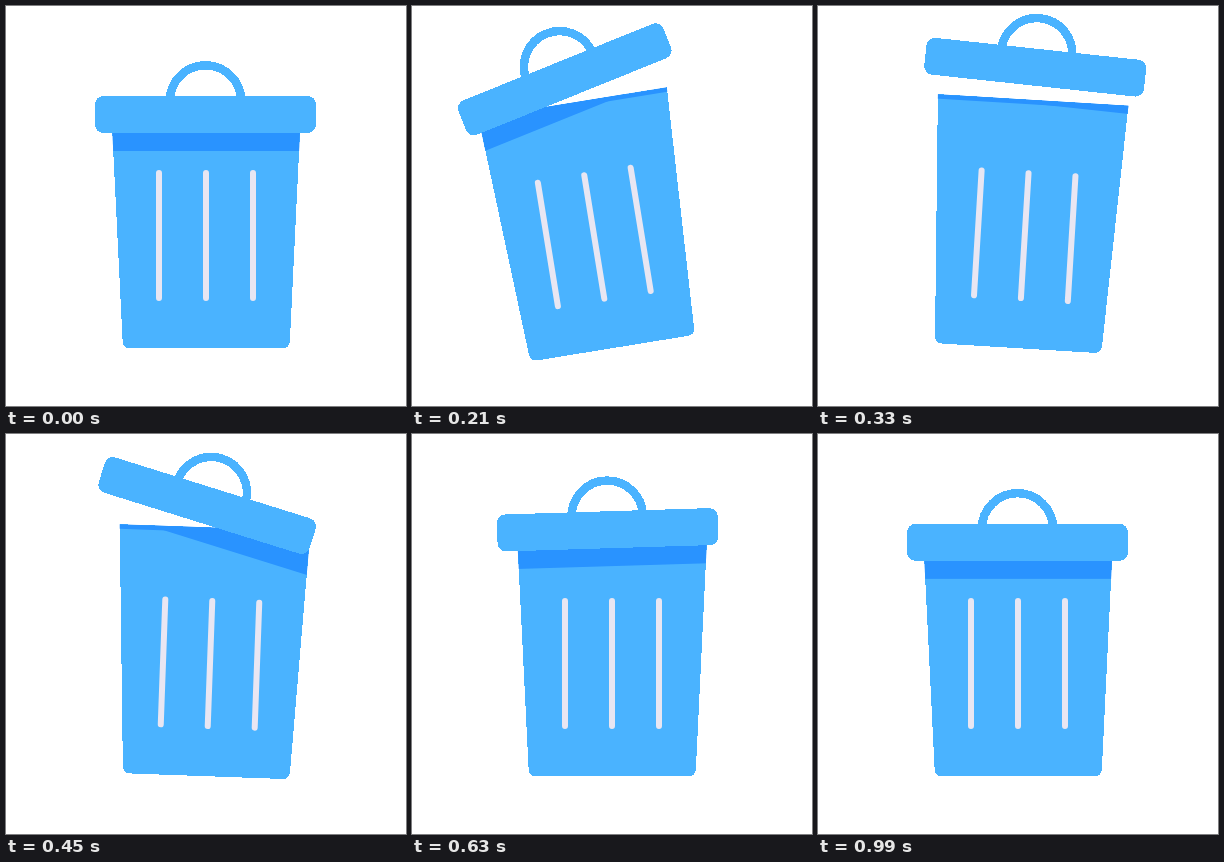
Write an HTML page that moves like this. It is 400 px wide and 400 px high and loops after 3.02 s.

```html
<!DOCTYPE html>
<html lang="en">
<head>
<meta charset="utf-8">
<title>Trash can</title>
<style>
  html, body { margin: 0; width: 100%; height: 100%; overflow: hidden; background: #fff; }
  svg { display: block; width: 100%; height: 100%; }
  .light { fill: #4ab3ff; }
  .dark { fill: #2993ff; }
  .crisp { shape-rendering: crispEdges; }
</style>
</head>
<body>
<svg viewBox="0 0 400 400">
  <defs>
    <path id="body" d="M104.7 93.5H295.6L283.9 335Q283.5 342.2 276.5 342.2H124Q117 342.2 116.6 335Z"/>
    <clipPath id="bodyClip"><use href="#body"/></clipPath>
  </defs>
  <g id="can">
    <use href="#body" class="light crisp"/>
    <g clip-path="url(#bodyClip)" class="dark">
      <rect x="100" y="90" width="200" height="8"/>
      <rect id="shade" x="50" y="-100" width="300" height="245"/>
    </g>
    <path d="M153 167V292M200 167V292M247 167V292" stroke="#e8e6f2" stroke-width="6" stroke-linecap="round"/>
    <g id="lid" class="crisp">
      <path d="M163.8 100V95A35.7 35.7 0 0 1 235.2 95V100" fill="none" stroke="#4ab3ff" stroke-width="8.5"/>
      <rect class="light" x="89" y="90" width="221" height="37" rx="8.5"/>
    </g>
  </g>
</svg>
<script>
  const LOOP = 3020, STEP = 30, MOTION_END = 990;
  const [can, lid, shade] = ["can", "lid", "shade"].map(id => document.getElementById(id));

  const ease = u => {
    u = Math.min(Math.max(u, 0), 1);
    return u * u * (3 - 2 * u);
  };

  // Eases from rest through [time, value] turning points.
  function swing(t, ...turns) {
    let from = 0, value = 0;
    for (const [to, target] of turns) {
      if (t < to) return value + (target - value) * ease((t - from) / (to - from));
      [from, value] = [to, target];
    }
    return value;
  }

  // The lid jumps up, then sinks back along a bell curve.
  function lift(t) {
    const fall = Math.max(0, t - 302) / 284;
    return 48.3 * ease(t / 290) * Math.exp(-fall * fall);
  }

  function render(time) {
    const t = Math.min(Math.floor(time / STEP) * STEP, MOTION_END);
    const canTilt = swing(t, [200, -9.4], [350, 4.15], [550, 0]);
    const lidTilt = swing(t, [205, -12.8], [440, 15.4], [635, -1.8], [750, 1.9], [990, 0]);
    const drift = swing(t, [210, -3.4], [330, 0.7], [450, -8], [800, 0]);
    const lidPose = `translate(${drift} ${-lift(t)}) rotate(${lidTilt} 199.5 108.5)`;
    can.setAttribute("transform", `rotate(${canTilt} 200 340)`);
    lid.setAttribute("transform", lidPose);
    shade.setAttribute("transform", lidPose);
  }

  const start = performance.now();
  function tick() {
    render((performance.now() - start) % LOOP);
    requestAnimationFrame(tick);
  }
  tick();
</script>
</body>
</html>
```
